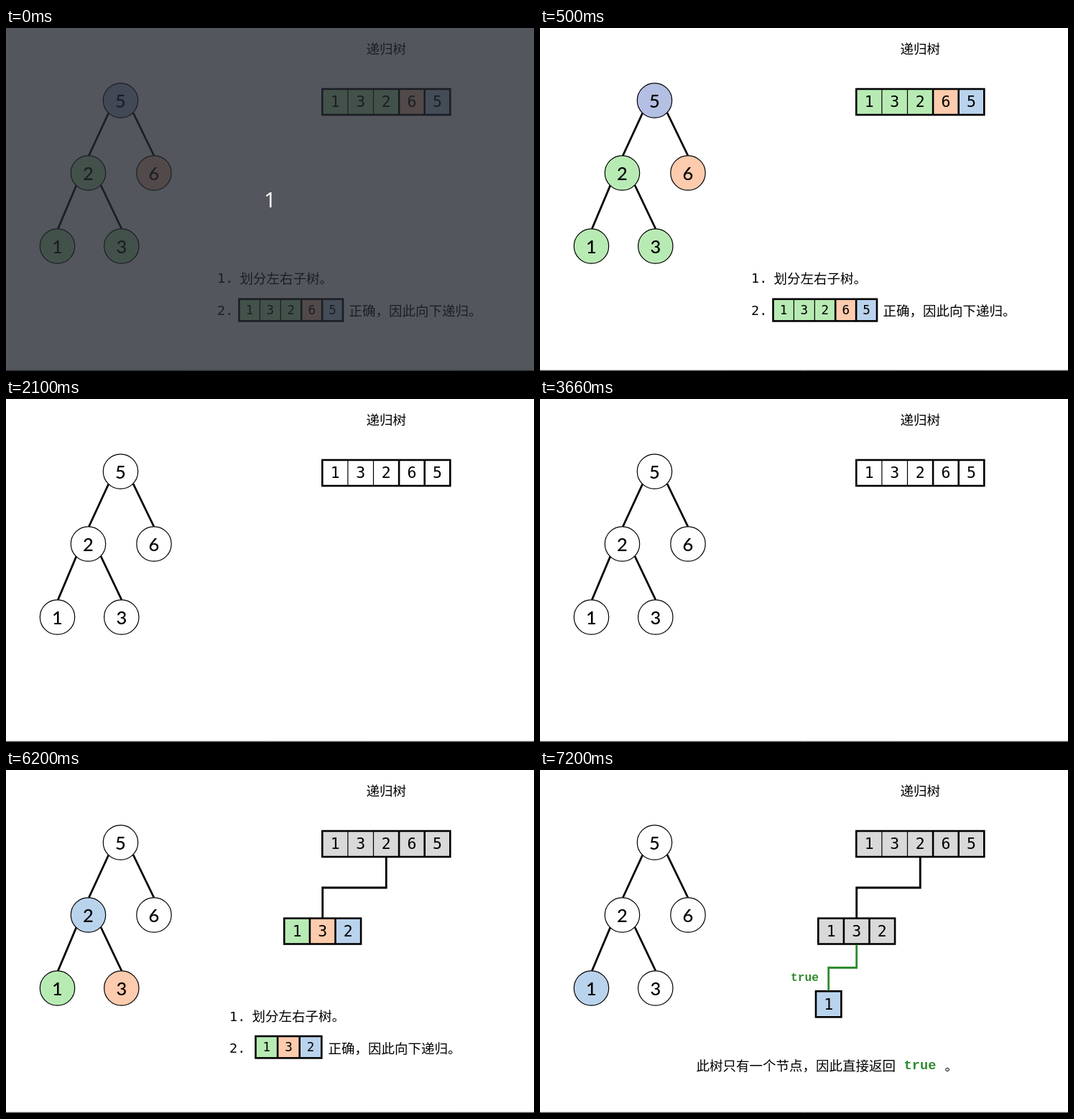
An HTML page with a canvas that plays this animation: 735 px wide and 478 px high, repeating every 8000 ms.

```html
<!DOCTYPE html>
<html lang="zh-CN">
<head>
<meta charset="utf-8">
<style>
html, body { margin: 0; width: 100%; height: 100%; overflow: hidden; background: #fff; }
canvas { display: block; width: 735px; height: 478px; }
</style>
</head>
<body>
<canvas id="stage" width="735" height="478"></canvas>
<script>
const ctx = document.getElementById('stage').getContext('2d');
const LOOP = 8000;
const COLOR = { w: '#fff', g: '#b8ebb4', o: '#fdcbad', b: '#bad3ed', v: '#b4bfe4', x: '#d9d9d9' };
const TRUE_GREEN = '#2f8b2f';
const HAN = '"Noto Sans CJK SC", "Noto Sans CJK", sans-serif';
const MONO = '"DejaVu Sans Mono", monospace';
const SLAB = '"Liberation Mono", monospace';

const NODES = [
  ['5', 159.5, 101], ['2', 114.5, 202], ['6', 206, 202], ['1', 71.5, 304], ['3', 160.8, 304]
];
const EDGES = [
  [[143, 118], [115.3, 178]], [[177, 118], [206, 178]],
  [[98, 219], [72.3, 280]], [[132, 219], [161, 280]]
];

function text(str, x, y, font, align = 'left', color = '#000') {
  ctx.font = font;
  ctx.textAlign = align;
  ctx.fillStyle = color;
  ctx.fillText(str, x, y);
}

const han = (str, x, y) => text(str, x, y, `300 18.5px ${HAN}`);

function path(points, color = '#000', width = 2.8) {
  ctx.beginPath();
  points.forEach(([x, y]) => ctx.lineTo(x, y));
  ctx.strokeStyle = color;
  ctx.lineWidth = width;
  ctx.stroke();
}

function tree(fills) {
  EDGES.forEach(edge => path(edge));
  NODES.forEach(([label, x, y], i) => {
    ctx.beginPath();
    ctx.arc(x, y, 24.2, 0, Math.PI * 2);
    ctx.fillStyle = COLOR[fills[i]];
    ctx.fill();
    ctx.lineWidth = 1.2;
    ctx.strokeStyle = '#000';
    ctx.stroke();
    text(label, x, y + 9.5, '500 25.5px Lato, sans-serif', 'center');
  });
}

// Dividers before index `firstBold` are thin.
function cells(digits, fills, x, y, size, height, fontSize, firstBold = 1) {
  const width = size * digits.length;
  [...digits].forEach((digit, i) => {
    ctx.fillStyle = COLOR[fills[i]];
    ctx.fillRect(x + i * size, y, size, height);
    text(digit, x + (i + 0.5) * size, y + height / 2 + fontSize * 0.345,
      `${fontSize}px ${MONO}`, 'center');
  });
  for (let i = 1; i < digits.length; i++) {
    const dx = x + i * size;
    path([[dx, y], [dx, y + height]], '#000', i < firstBold ? 1.2 : 2.6);
  }
  ctx.strokeStyle = '#000';
  ctx.lineWidth = 2.6;
  ctx.strokeRect(x, y, width, height);
}

const rootArray = fills => cells('13265', fills, 440.3, 85, 35.6, 36, 21.5, 3);
const leftArray = fills => cells('132', fills, 387.3, 206.7, 35.6, 35.8, 21.5);

function steps(x, y, textX) {
  text('1.', x, y, `18.5px ${MONO}`);
  text('2.', x, y + 44.5, `18.5px ${MONO}`);
  han('划分左右子树。', x + 31.5, y + 0.5);
  han('正确，因此向下递归。', textX, y + 45.5);
}

function leftLink() {
  path([[529.3, 121], [529.3, 164], [440.7, 164], [440.7, 207]]);
}

function partitionRoot() {
  tree('vgogg');
  rootArray('gggob');
  steps(294, 355, 477.5);
  cells('13265', 'gggob', 324.5, 377.8, 28.9, 30.6, 17.5, 3);
}

function plain() {
  tree('wwwww');
  rootArray('wwwww');
}

function partitionLeft() {
  tree('wbwgo');
  leftLink();
  rootArray('xxxxx');
  leftArray('gob');
  steps(311, 349.5, 448.5);
  cells('132', 'gob', 347.5, 371, 30.6, 30.4, 17.5);
}

function singleNode() {
  tree('wwwbw');
  leftLink();
  rootArray('xxxxx');
  leftArray('xxx');
  cells('1', 'b', 384, 308.3, 35.4, 36, 21.5);
  path([[440.7, 243.7], [440.7, 275.5], [401.7, 275.5], [401.7, 307.5]], TRUE_GREEN);
  text('true', 349, 294, `bold 16.3px ${SLAB}`, 'left', TRUE_GREEN);
  han('此树只有一个节点，因此直接返回', 217.5, 418.5);
  text('true', 506.5, 417, `bold 18.7px ${SLAB}`, 'left', TRUE_GREEN);
  han('。', 563.5, 418.5);
}

function countdown() {
  ctx.fillStyle = 'rgba(35, 39, 47, 0.78)';
  ctx.fillRect(0, 0, 735, 478);
  text('1', 367.5, 250, '29px "Noto Sans", sans-serif', 'center', '#fff');
}

function draw() {
  const t = performance.now() % LOOP;
  ctx.fillStyle = '#fff';
  ctx.fillRect(0, 0, 735, 478);
  han('递归树', 501.5, 36);
  path([[0, 477.3], [735, 477.3]], '#222', 1);

  if (t < 2100) partitionRoot();
  else if (t < 4700) plain();
  else if (t < 7200) partitionLeft();
  else singleNode();
  if (t < 500) countdown();

  requestAnimationFrame(draw);
}
draw();
</script>
</body>
</html>
```
